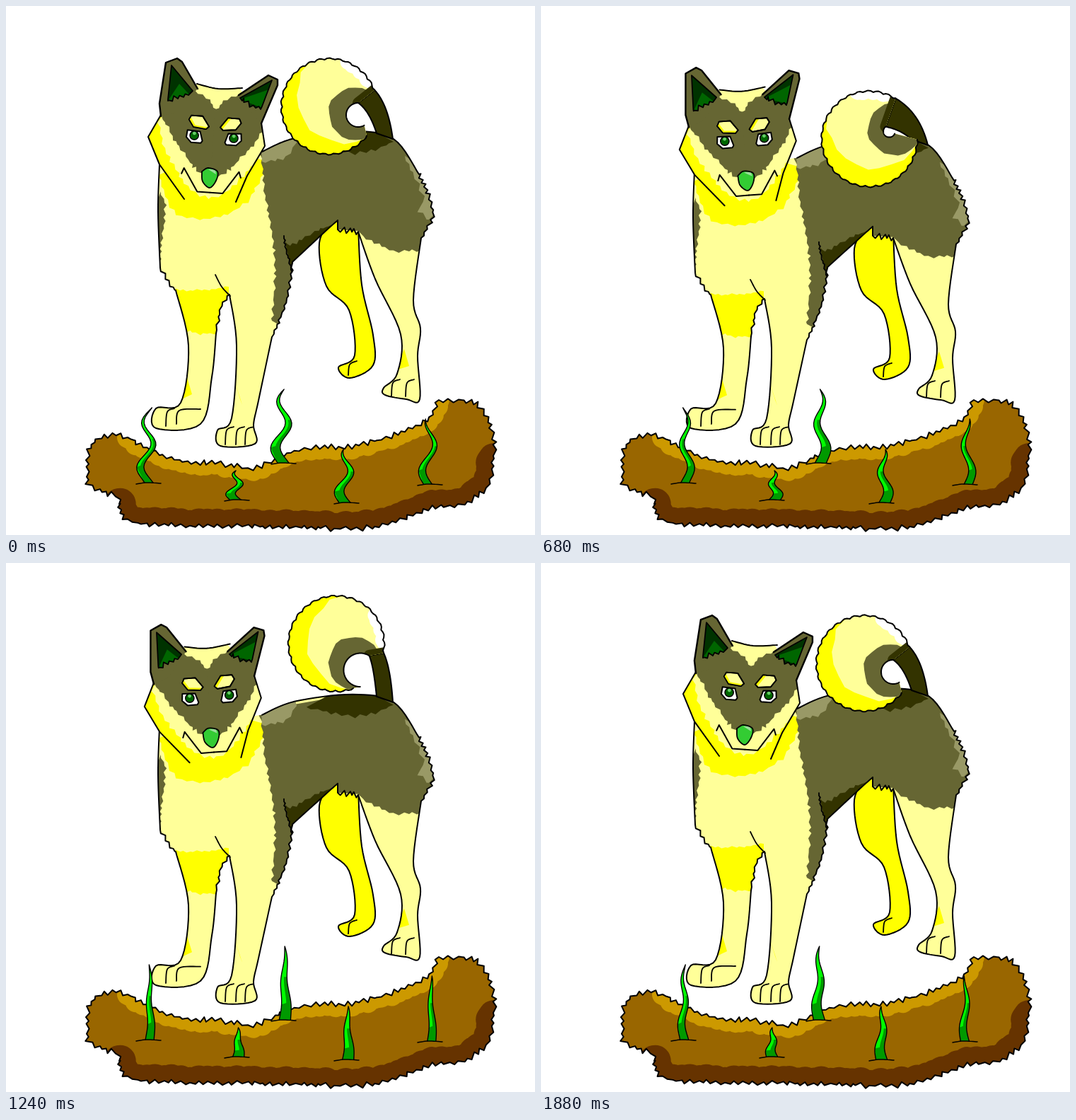
An HTML page with a canvas for the animation above (1920 ms loop, 748 by 748 pixels).

```html
<!DOCTYPE html>
<html lang="en">
<head>
<meta charset="utf-8">
<title>Dog on a mound</title>
<style>
html, body { margin: 0; width: 100%; height: 100%; overflow: hidden; background: #fff; }
canvas { display: block; width: 748px; height: 748px; }
</style>
</head>
<body>
<canvas id="stage" width="748" height="748"></canvas>
<script>
const ctx = document.getElementById('stage').getContext('2d');
const LOOP = 1920, STEP = 40, TAU = Math.PI * 2, DEG = Math.PI / 180;
const CREAM = '#ffff99', YELLOW = '#ffff00', GREY = '#666633', DARK = '#333300', PALE = '#999966';
const clamp = (v, lo = 0, hi = 1) => Math.min(hi, Math.max(lo, v));
const mix = (a, b, k) => a + (b - a) * k;
const range = (n, f) => Array.from({ length: n + 1 }, (_, i) => f(i / n));

let seed = 11;
const rnd = () => (seed = seed * 16807 % 2147483647) / 2147483647;

// Outlines: straight corners, smooth curve, ragged fur edge
const poly = s => s.trim().split(/\s+/).map(p => p.split(',').map(Number));

function curve(s) {
  const p = poly(s), last = p.length - 1, out = [];
  for (let i = 0; i < last; i++) {
    const a = p[Math.max(0, i - 1)], b = p[i], c = p[i + 1], d = p[Math.min(last, i + 2)];
    for (let t = 0; t < 0.99; t += 0.125) {
      out.push([0, 1].map(j => b[j] + t / 2 * (c[j] - a[j] +
        t * (2 * a[j] - 5 * b[j] + 4 * c[j] - d[j] + t * (3 * (b[j] - c[j]) + d[j] - a[j])))));
    }
  }
  return [...out, p[last]];
}

function fur(s, amp = 2.5, step = 5) {
  const p = curve(s), out = [p[0]];
  let next = step, side = 1, run = 0;
  for (let i = 1; i < p.length; i++) {
    const [x, y] = p[i - 1], dx = p[i][0] - x, dy = p[i][1] - y, len = Math.hypot(dx, dy) || 1;
    for (; next <= run + len; next += step * (0.5 + rnd())) {
      const k = (next - run) / len, off = side * amp * rnd() / len;
      out.push([x + dx * k - dy * off, y + dy * k + dx * off]);
      side = -side;
    }
    run += len;
  }
  return [...out, p[p.length - 1]];
}

const same = p => p;

function trace(pts, map = same) {
  ctx.beginPath();
  pts.forEach(p => ctx.lineTo(...map(p)));
}
function fill(pts, color, map) {
  trace(pts, map);
  ctx.fillStyle = color;
  ctx.fill();
}
function ink(pts, map, width = 2, color = '#000') {
  trace(pts, map);
  ctx.lineWidth = width;
  ctx.strokeStyle = color;
  ctx.stroke();
}
function shape(pts, color, map, width) {
  fill(pts, color, map);
  ink([...pts, pts[0]], map, width);
}
function inside(pts, map, draw) {
  ctx.save();
  trace(pts, map);
  ctx.clip();
  draw();
  ctx.restore();
}

// Mound: two thick rims clipped to the outline give light and shade
const crest = fur('172,610 232,639 310,648 355,652 422,625 500,621 590,588 612,557', 4, 6);
const foot = fur('690,640 680,680 640,707 600,709 520,737 360,736 185,731 160,704', 4, 6);
const soil = [...crest, ...fur('612,557 664,562 688,606 690,640', 4, 6), ...foot,
  ...fur('160,704 158,694 123,682 114,664 120,622 145,607 172,610', 4, 6)];

function drawSoil() {
  fill(soil, '#996600');
  inside(soil, same, () => {
    ink(crest, same, 30, '#cc9900');
    ink(foot, same, 44, '#663300');
  });
  ink([...soil, soil[0]]);
}

// Grass: root x, root y, height
const blades = [[203, 674, 106], [394, 646, 104], [328, 698, 41], [483, 702, 75], [601, 676, 92]];

function drawBlade([x, y, h], i, w) {
  const half = 6 + (i % 4 && 2), amp = 4 + h / 24, wave = 0.6 + 0.04 * i;
  const edge = side => range(24, u => [
    x + w * (amp * Math.cos(TAU * (u - 0.21) / wave) + 6 * (1 - u)) + side * half * Math.pow(1 - u, 0.75),
    y - h * u
  ]);
  const left = edge(-1), right = edge(1), rib = edge(0);
  const blade = [...left, ...right.reverse()];
  fill(blade, '#00ff00');
  inside(blade, same, () => {
    fill([...rib.slice(0, 15), ...right.slice(10)], '#009900');
    fill([left[0], left[5], right[18], right[24]], '#009900');
  });
  ink(blade, same, 1.4);
  ink(curve(`${x - 19},${y + 2} ${x - 4},${y} ${x + 16},${y + 1}`), same, 1.5);
}

// Body
const farLeg = curve('462,300 443,335 453,396 485,430 493,494 470,511 486,526 519,508 519,465 503,394 498,312');
const chest = [
  ...curve('217,224 215,290 218,370'), ...fur('218,370 231,392 240,402'),
  ...curve('240,402 258,480 247,561 212,569 212,597 275,591 291,525 297,463'),
  ...fur('297,463 304,425 316,408'),
  ...curve('316,408 326,480 319,583 299,600 303,622 352,619 350,592 357,558 376,468')
];
const rump = [
  ...fur('376,468 396,418 405,362'), ...curve('405,362 450,320 469,303'), ...fur('469,316 498,319', 5, 4),
  ...curve('498,319 522,386 558,464 553,520 534,540 536,550 566,556 585,556 582,495 586,456 576,416 587,328'),
  ...fur('587,328 604,290 584,238', 3),
  ...curve('584,238 548,188 490,177 408,187 362,206')
];
const body = [...chest, ...rump];
const patches = [
  [GREY, [...fur('219,262 225,285 221,330 216,374'), [205, 300]]],
  [YELLOW, [...fur('370,220 345,272 300,299 242,294 214,240', 3, 8), [300, 200]]],
  [GREY, [...fur('358,200 366,262 380,352 376,445', 3, 7), ...poly('420,470 408,362 468,316 498,318'),
    ...fur('505,325 545,345 584,346', 3, 6), ...poly('640,340 640,150')]],
  [PALE, [...fur('412,180 398,212 362,220', 3, 6), [360, 180]]],
  [PALE, [...fur('564,212 590,270 582,288 598,302', 3, 7), [640, 260]]],
  [DARK, [...fur('548,192 500,208 425,195', 3, 7), [490, 160]]],
  [DARK, [...fur('393,326 402,338 440,318 470,306', 2.5, 6), [404, 376]]],
  [YELLOW, [...fur('230,401 275,402 315,397'), ...fur('315,462 275,463 240,457')]],
  ...[[256, 525, -10], [324, 532, 10], [563, 485, -12]].map(([x, y, dx]) =>
    [YELLOW, [[x, y], [x + 7, y + 24], [x + dx, y + 42 - Math.abs(dx)]]])
];

// Toe lines rise from the sole and curl over
const toe = (x, y, h) => curve(`${x + 12},${y - h - 5} ${x + 2},${y - h} ${x},${y}`);
const bodyLines = [
  curve('296,380 305,397 317,410'), fur('393,325 398,352 404,377', 2, 4),
  toe(226, 594, 20), curve('275,570 245,572 241,591'),
  ...[310, 325, 338].map(x => toe(x, 620, 20)), ...[545, 565].map(x => toe(x, 552, 19)), toe(484, 522, 15)
];

function drawBody(map) {
  shape(farLeg, YELLOW, map);
  fill(body, CREAM, map);
  inside(body, map, () => patches.forEach(([color, pts]) => fill(pts, color, map)));
  ink(body, map);
  bodyLines.forEach(l => ink(l, map, 1.8));
}

// Tail: a crescent around a hole, joined to the rump by a bent trunk
const arc = (from, to, r, cx = 0, cy = 0, wobble = () => 0) => range(96, k => {
  const a = mix(from, to, k) * DEG, d = r + wobble(a);
  return [cx + d * Math.cos(a), cy + d * Math.sin(a)];
});
const ragged = r => arc(0, 360, r, 0, 0, () => 0).filter((_, i) => i % 4 === 0)
  .map(([x, y]) => [x, y].map(v => v * (0.95 + rnd() * 0.1)));
const rim = arc(-20, -322, 66, 0, 0, a => 2.6 * Math.abs(Math.sin(a * 15)));
const creamSpot = ragged(68), greySpot = ragged(38), whiteSpot = ragged(62);
const shift = (pts, dx, dy) => pts.map(([x, y]) => [x + dx, y + dy]);
const bow = (a, c, b) => range(16, k => [0, 1].map(j => mix(mix(a[j], c[j], k), mix(c[j], b[j], k), k)));

function drawTail(d, sag) {
  const turn = (0.0035 * d * d - 0.92 * d) * DEG, cos = Math.cos(turn), sin = Math.sin(turn);
  const cx = 457 - 0.15 * d + 0.006 * d * d, cy = 142 + 0.92 * d;
  const ring = ([x, y]) => [cx + x * cos - y * sin, cy + x * sin + y * cos];
  const k = 1 - 0.006 * d, hole = arc(60, 270, 17 * k * k, 41 * k, 12 * k);
  const curl = [...rim, ...hole];
  const root = [547, 188 + sag], top = ring(rim[0]), inner = ring(hole[96]), heel = [524, 180 + sag];
  const outer = bow(top, [mix(top[0], root[0], 0.75), mix(top[1], root[1], 0.3)], root);
  const bend = [mix(inner[0], heel[0], 0.6), mix(inner[1], heel[1], 0.25)];
  shape([...outer, ...bow(heel, bend, inner)], DARK);
  fill(curl, YELLOW, ring);
  inside(curl, ring, () => {
    fill(shift(creamSpot, 21, -16), CREAM, ring);
    inside(shift(ragged62, 0, 0), ring, () => {});
    ink(rim.slice(4, 16), ring, 22, '#fff');
    fill(shift(greySpot, 37, 10), GREY, ring);
    ink([rim[0], hole[96]], ring, 16, DARK);
  });
  ink(rim, ring);
  ink(hole, ring);
}
const ragged62 = whiteSpot;

// Head
const skull = poly('219,154 201,185 217,224 252,273 290,286 325,277 341,240 366,198 361,165 330,116 300,117 270,110');
const faceCream = [...poly('262,100 345,110 375,165'), ...fur('366,206 340,236 303,267 268,264 232,218 214,165', 3, 7)];
const ears = [poly('219,156 217,138 226,80 242,74 249,79 271,117 240,150'),
  poly('361,166 384,112 384,104 371,98 329,126 347,150')];
const earInner = [[...poly('229,132 234,84 264,120'), ...fur('258,126 229,134', 5, 4)],
  [...poly('331,130 376,105 362,142'), ...fur('360,146 334,134', 5, 4)]];
const earGlow = [poly('245,110 262,128 229,134'), poly('372,118 362,144 331,132')];
const crown = curve('270,110 300,117 334,116');
const nose = curve('277,234 286,229 299,234 297,247 288,257 278,248 277,234');
const shine = poly('286,231 296,231 297,238');

// One half of the face, mirrored about the tilted middle line
const half = {
  mask: [...fur('-1,-40 16,-56 34,-66', 2.5, 5), ...poly('58,-70 78,-30'), ...fur('74,-20 43,23 18,50 -1,56', 3, 5)],
  eye: poly('16,6 20,-7 38,-8 39,2 32,9 18,9'),
  pupil: arc(0, 360, 6, 28, -1),
  glint: arc(0, 360, 2.4, 28, -4),
  lid: curve('16,6 32,4 42,-7'),
  brow: poly('8,-15 18,-29 34,-29 37,-23 30,-13 12,-11'),
  jaw: poly('0,78 18,78 39,46 42,54')
};

function eachSide(draw) {
  for (const side of [-1, 1]) {
    ctx.save();
    ctx.translate(294, 186);
    ctx.rotate(4.2 * DEG);
    ctx.scale(side, 1);
    draw(side);
    ctx.restore();
  }
}

function drawHead(angle, closed) {
  ctx.save();
  ctx.translate(316, 228);
  ctx.rotate(-angle * DEG);
  ctx.translate(-316, -228);
  fill(skull, YELLOW);
  inside(skull, same, () => {
    fill(faceCream, CREAM);
    eachSide(() => fill(half.mask, GREY));
  });
  ink(skull.slice(0, 4));
  ink(skull.slice(5, 9));
  ink(crown);
  ears.forEach((ear, i) => {
    fill(ear, GREY);
    ink(ear.slice(0, -1), same, 2.4);
    fill(earInner[i], '#003300');
    inside(earInner[i], same, () => fill(earGlow[i], '#006600'));
    ink([...earInner[i], earInner[i][0]], same, 1.8);
  });
  eachSide(side => {
    shape(half.brow, CREAM, same, 1.8);
    inside(half.brow, same, () => ink(poly(side < 0 ? '37,-23 30,-12 12,-10' : '8,-15 18,-29'), same, 8, YELLOW));
    ink([...half.brow, half.brow[0]], same, 1.8);
    ink(half.jaw);
    if (closed) return ink(half.lid, same, 3.2);
    fill(half.eye, '#fff');
    inside(half.eye, same, () => {
      shape(half.pupil, '#006600', same, 1.6);
      fill(half.glint, '#66cc66');
    });
    ink([...half.eye, half.eye[0]]);
  });
  fill(nose, '#33cc33');
  fill(shine, '#99dd99');
  ink(nose, same, 1.8);
  ctx.restore();
}

// Motion: tail eases in, swings up evenly, eases out
function tailDrop(t) {
  if (t < 720) return 56 * (t / 720) ** 2;
  if (t < 1280) return mix(56, -37, (t - 720) / 560);
  return -37 * ((LOOP - t) / 640) ** 2;
}
// Grass snaps into a full sway every half of its cycle and relaxes between
function sway(t) {
  const s = t % 960, k = (s % 480 - 40) / 400;
  if (k < 0) return s < 480 ? -1 : 1;
  return s < 480 ? mix(-0.45, 0.6, k) : mix(0.9, -0.35, k * k);
}

function draw(t) {
  const nod = Math.min(15.5, 19 * (Math.min(t, LOOP - t) / 1000) ** 2);
  const sag = Math.min(14, nod);
  const squash = ([x, y]) => [x, y + sag * clamp((590 - y) / 270)];
  ctx.fillStyle = '#fff';
  ctx.fillRect(0, 0, 748, 748);
  ctx.lineJoin = ctx.lineCap = 'round';
  drawSoil();
  drawBody(squash);
  drawTail(tailDrop(t), sag);
  drawHead(nod, t >= 1000 && t < 1160);
  blades.forEach((b, i) => drawBlade(b, i, sway(t)));
}

function tick() {
  draw(Math.floor(performance.now() % LOOP / STEP) * STEP);
  requestAnimationFrame(tick);
}
tick();
</script>
</body>
</html>
```
